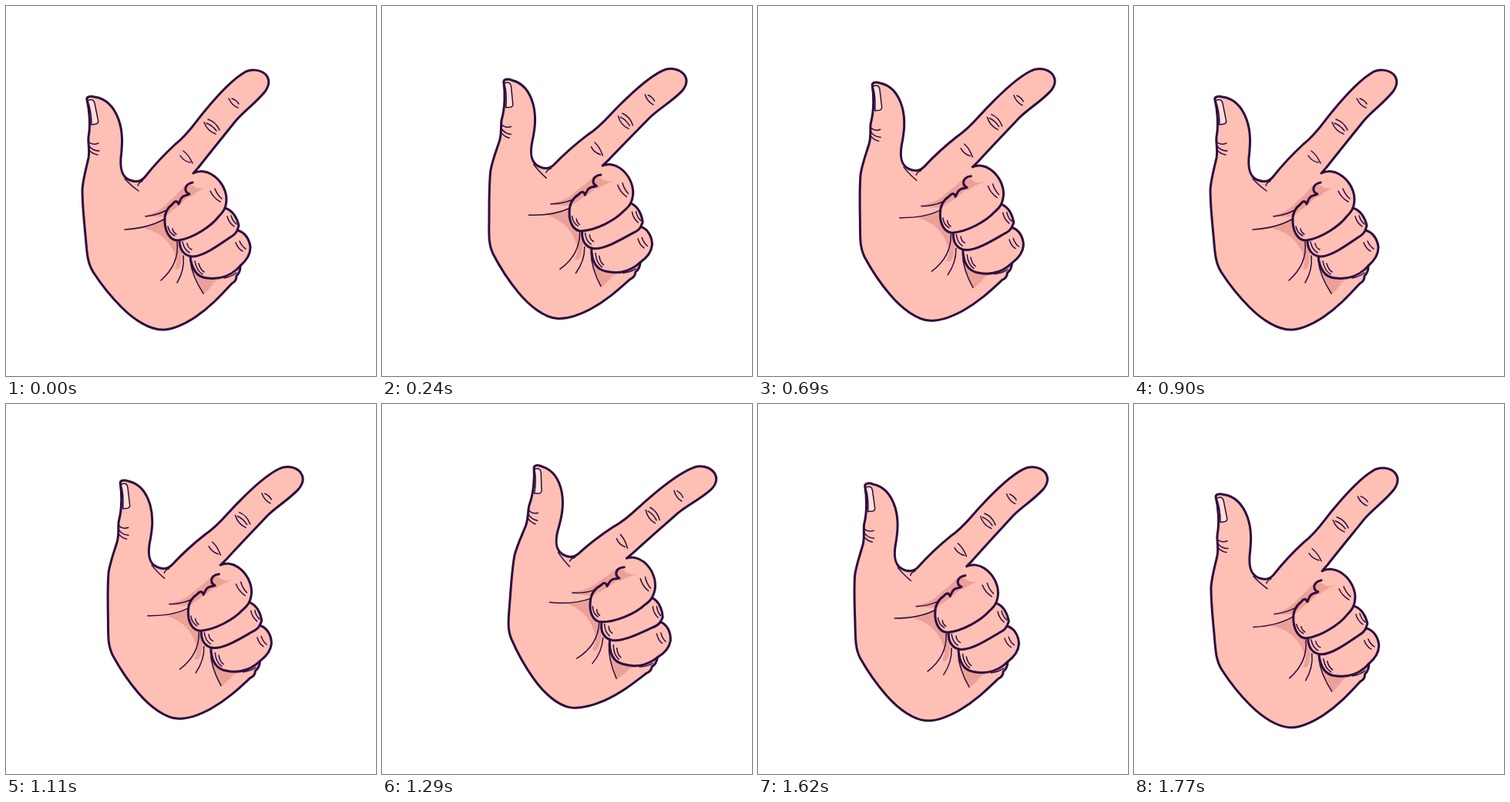
An HTML page for the animation above (1.8 s loop, 480x480 px).

```html
<!DOCTYPE html>
<html lang="en">
<head>
<meta charset="utf-8">
<title>Swinging hand</title>
<style>
  html, body { margin: 0; width: 100%; height: 100%; overflow: hidden; background: #fff; }
  svg { display: block; width: 100%; height: 100%; }
  path { fill: none; stroke-linecap: round; stroke-linejoin: round; }
  .line { stroke: #2d0d3f; stroke-width: 3; }
  .thin { stroke: #2d0d3f; stroke-width: 1.5; }
  .skin { fill: #febfb5; }
  .shade { fill: #eca198; }
  .nail { fill: #ffe0da; }
</style>
</head>
<body>
<svg viewBox="0 0 480 480">
  <g id="hand">
    <path class="skin line" d="M105 122C104 118 109 116 115 118C130 120 140 131 146 147
      C152 164 151 180 149 197C148 211 150 222 161 226C169 229 175 228 180 222
      C195 203 208 190 220 179C236 167 246 150 258 136C272 119 290 98 308 87
      C317 81 330 82 337 89C343 96 341 104 336 111C324 126 309 136 298 149
      C282 169 264 191 250 209L243 217C250 213 259 214 266 218
      C278 225 285 237 286 249Q286 257 284 262C294 265 300 275 302 285L300 291
      C310 293 316 303 317 313C317 323 311 331 304 337Q304 346 299 350Q299 357 293 360
      C281 373 266 390 245 404C231 413 215 420 203 420C187 420 167 408 150 391
      C136 377 124 362 113 345C105 332 105 319 103 297C101 277 99 257 99 238
      C100 224 104 211 107 197C109 186 106 177 107 170C110 154 108 134 105 122Z"/>

    <path class="shade" d="M178 272Q200 268 211 254Q223 244 232 233L239 245L228 256L208 272Q195 275 178 272Z"/>
    <path class="shade" d="M170 287Q190 286 206 277Q207 298 224 304L228 320Q228 346 219 341Q223 330 220 324Q208 291 170 287Z"/>
    <path class="shade" d="M238 326Q242 346 258 353L280 354Q269 356 267 363L257 374Q239 350 238 326Z"/>
    <path class="shade" d="M233 235Q240 230 244 234Q250 239 262 234Q248 240 239 248L233 245Z"/>

    <path class="line" d="M242 229C236 230 232 234 233 239Q234 243 238 244
      M236 245Q228 246 226 252L224 257Q221 250 216 257C208 263 205 271 206 281
      C207 295 214 305 224 304C243 301 266 286 276 273Q282 267 284 262
      M225 304C225 317 232 325 243 325C258 324 279 308 291 300Q298 296 300 291
      M239 325C241 342 248 352 261 353C277 355 290 350 299 342L304 337"/>

    <path class="thin" d="M154 290Q186 288 206 276 M181 273Q197 271 208 265
      M201 356C218 341 224 325 222 306 M222 359Q232 342 230 324
      M239 330Q241 350 256 373
      M154 224Q161 232 172 240 M177 227Q172 229 171 233
      M283 353Q293 351 299 346
      M108 177Q113 181 120 178 M108 182Q113 188 121 188 M109 188Q113 192 119 193
      M226 194Q230 201 239 203 M230 188Q237 193 242 204
      M257 151Q261 162 272 166 M260 152Q268 155 273 162 M262 147Q272 150 277 161
      M289 120Q293 129 301 132 M293 120Q299 122 302 127
      M265 240Q269 249 278 254 M271 237Q274 245 280 250
      M287 273Q289 281 296 286 M292 272Q294 279 299 283
      M298 307Q301 315 307 318 M303 305Q306 312 311 315
      M210 286Q212 295 219 298 M216 289Q217 294 221 296
      M229 306Q231 316 238 320 M235 308Q236 314 241 316
      M245 331Q247 343 255 348 M250 334Q252 342 257 345"/>

    <path class="nail thin" d="M106 123Q113 119 115 126L119 146Q121 152 117 153L111 154Q111 137 106 123Z"/>
  </g>
</svg>
<script>
  const hand = document.getElementById("hand");
  const STEP = 30, HALF = 450;

  function draw() {
    const t = Math.floor(performance.now() / STEP) * STEP % (2 * HALF);
    const u = 1 - Math.abs(t / HALF - 1);
    const k = u * u * (3 - 2 * u); // ease in and out
    hand.setAttribute("transform",
      `translate(${72.8 * k} ${-24 * k}) rotate(${10.1 * k} 210 250)`);
    requestAnimationFrame(draw);
  }
  draw();
</script>
</body>
</html>
```
